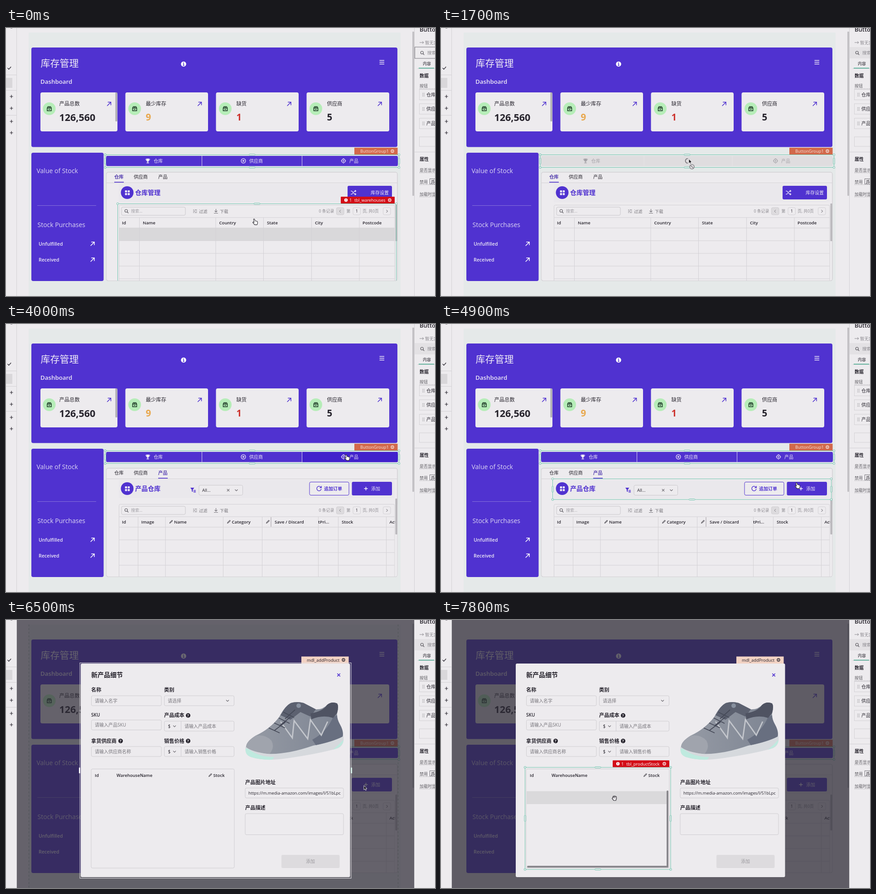
An HTML page for the animation above (7900 ms loop, 947x591 px).

```html
<!DOCTYPE html>
<html lang="zh-CN">
<head>
<meta charset="utf-8">
<title>库存管理</title>
<style>
html, body { margin: 0; width: 100%; height: 100%; overflow: hidden; background: #edebee; }
svg { display: block; width: 947px; height: 591px; font-family: "Open Sans", "Noto Sans CJK SC", "Noto Sans CJK", sans-serif; }
text { white-space: pre; }
</style>
</head>
<body>
<svg id="stage" viewBox="0 0 947 591"></svg>
<script>
const LOOP = 7900, STEP = 100;
const PAPER = '#edebee', PURPLE = '#5032d0', DEEP = '#4122cc', INK = '#26232c', GREY = '#8b898f',
      RULE = '#d3d1d5', GREEN = '#73c7b0', RED = '#d30d18', LIGHT = '#eeeaf6';

// Shape helpers, each returning SVG markup
const rect = (x, y, x2, y2, fill = 'none', stroke = 'none', r = 0, w = 1) =>
  `<rect x="${x}" y="${y}" width="${x2 - x}" height="${y2 - y}" rx="${r}" fill="${fill}" stroke="${stroke}" stroke-width="${w}"/>`;
const text = (x, y, s, size = 10, fill = INK, weight = 400) =>
  `<text x="${x}" y="${y}" font-size="${size}" fill="${fill}" font-weight="${weight}">${s}</text>`;
const line = (d, stroke = RULE, w = 1, fill = 'none') =>
  `<path d="${d}" stroke="${stroke}" stroke-width="${w}" fill="${fill}"/>`;
const shape = (d, fill) => `<path d="${d}" fill="${fill}"/>`;
const dot = (x, y, r, fill = 'none', stroke = 'none', w = 1) =>
  `<circle cx="${x}" cy="${y}" r="${r}" fill="${fill}" stroke="${stroke}" stroke-width="${w}"/>`;
const at = (x, y, body) => `<g transform="translate(${x} ${y})">${body}</g>`;
// Groups shown only during the given [from, to) spans
const during = (spans, ...body) => `<g data-spans="${spans}">${body.join('')}</g>`;

// Icons, centred on x, y
const plus = (x, y, c = INK, r = 3.5, w = 1.2) => line(`M${x - r} ${y}h${2 * r}M${x} ${y - r}v${2 * r}`, c, w);
const cross = (x, y, c, r = 3, w = 1.1) => line(`M${x - r} ${y - r}l${2 * r} ${2 * r}m0 ${-2 * r}l${-2 * r} ${2 * r}`, c, w);
const arrow = (x, y, c) => line(`M${x - 4.3} ${y + 4.3}l8.2-8.2M${x - 2.8} ${y - 4}h6.8v6.8`, c, 1.5);
const chevron = (x, y, c = '#66646b', r = 3) => line(`M${x - r} ${y - r / 2}l${r} ${r}l${r}${-r}`, c, 1.1);
const lens = (x, y, c = '#55535a') => dot(x - .7, y - .7, 3, 'none', c, 1.1) + line(`M${x + 1.5} ${y + 1.5}l2.8 2.8`, c, 1.2);
const gear = (x, y, c) => dot(x, y, 3, 'none', c, 1.3) + dot(x, y, 1, c);
const pencil = (x, y) => line(`M${x - 3} ${y + 3}l1-2.5l4.5-4.5l1.5 1.5l-4.5 4.5z`, '#55535a', 1, '#99979c');
const grid = (x, y) => [[-5, -5], [1, -5], [-5, 1], [1, 1]].map(([a, b]) => rect(x + a, y + b, x + a + 4.5, y + b + 4.5, LIGHT, 'none', .8)).join('');
const help = (x, y) => dot(x, y, 5, INK) + text(x - 2.2, y + 3.2, '?', 8.5, PAPER, 700);
const crate = (x, y) => line(`M${x - 4.5} ${y - 1.5}h9v6h-9zl1.5-3h6l1.5 3M${x} ${y - 4.5}v3M${x - 1.8} ${y + 1.6}h3.6`, '#173220', 1.5);
const alert = (x, y) => dot(x, y, 3.7, '#fff') + line(`M${x} ${y - 2.2}v2.6m0 .8v1`, RED, 1.1);
const icons = [
  (x, y, c) => shape(`M${x - 3} ${y - 5}h6v4q-.6 2.5-2.3 2.8v2h2v1.4h-5.4v-1.4h2v-2q-1.7-.3-2.3-2.8z`, c) + line(`M${x - 3} ${y - 4}h-1.6q0 3 2 3.2M${x + 3} ${y - 4}h1.6q0 3-2 3.2`, c, .9),
  (x, y, c) => dot(x, y, 4.9, 'none', c, 1.3) + plus(x, y, c, 2.4, 1.3),
  (x, y, c) => dot(x, y, 4, 'none', c, 1.3) + dot(x, y, 1.5, c) + line(`M${x} ${y - 5.6}v2m0 7.2v2M${x - 5.6} ${y}h2m7.2 0h2`, c, 1.2),
];

// Selection outline with corner squares and pill handles on the listed sides
function outline(x, y, x2, y2, sides) {
  const mx = (x + x2) / 2, my = (y + y2) / 2;
  const grips = { t: [mx, y, 6.5, 1.5], b: [mx, y2, 6.5, 1.5], l: [x, my, 1.5, 6.5], r: [x2, my, 1.5, 6.5] };
  return rect(x, y, x2, y2, 'none', GREEN) +
    [[x, y], [x2, y], [x, y2], [x2, y2]].map(([a, b]) => rect(a - 2, b - 2, a + 2, b + 2, PAPER, GREEN, 1)).join('') +
    [...sides].map(s => grips[s]).map(([a, b, w, h]) => rect(a - w, b - h, a + w, b + h, PAPER, GREEN, 1)).join('');
}
const errorTag = (x, y, x2, name) => rect(x, y, x2, y + 15, RED, 'none', 1) + alert(x + 11.5, y + 7.5) +
  text(x + 19, y + 11, '1', 9.4, '#fff') + text(x + 30, y + 11, name, 9.4, '#fff') + gear(x2 - 11, y + 7.5, '#fff');

function sidePanels() {
  const small = (y, s) => text(913, y, s, 9, '#5d5b61') + `<path d="M913 ${y + 3}h34" stroke="#aaa8ad" stroke-dasharray="2 1.5"/>`;
  const item = (y, s) => rect(912.5, y - 11.5, 960, y + 11.5, 'none', RULE) +
    [-3, 0, 3].map(d => dot(920, y + d, .8, GREY) + dot(923, y + d, .8, GREY)).join('') + text(928, y + 3.5, s, 10);
  return rect(0, 0, 23, 591, PAPER) + line('M23.5 0V591M0 103.5H23M0 137.5H23M0 192.5H23') + rect(0, 110, 14, 132, '#d9d7da') +
    line('M3.5 88l2.7 3l5-5.5', INK, 1.2) + line('M10 0h4', INK) + [151, 177, 206, 231].map(y => plus(12, y)).join('') +
    rect(901, 0, 947, 591, PAPER) + line('M901.5 0V591') +
    text(913, 8, 'Button', 13, INK, 600) + line('M913 32h9m-3-2.5l3 2.5l-3 2.5', GREY) + text(925, 35.5, '暂无实体', 9.5, GREY) +
    during('0-1500', rect(902.5, 42, 960, 67, PAPER, '#77757c')) +
    during('1500-7900', rect(902, 42, 960, 67, '#e3e1e4')) +
    lens(919, 55) + text(930, 58, '搜索', 9.5, GREY) +
    line('M908 89.5H947') + text(920, 82, '内容', 9) + line('M911 88.5H945', '#40a98a', 1.6) +
    text(913, 109, '数据', 10, INK, 600) + small(131, '按钮') +
    item(147, '仓库') + item(178.5, '供应商') + item(210.5, '产品') + rect(912.5, 240, 960, 261, 'none', RULE) +
    line('M902 273.5H947') + text(913, 293, '属性', 10, INK, 600) + small(316.5, '是否显示') + small(342.5, '禁用') +
    rect(935.5, 332.5, 960, 344, PAPER, '#77757c') + text(939, 341.5, 'JS', 8.5, INK, 600) + small(369.5, '加载时显示');
}

function header() {
  const card = ([x, x2, cx, tx, ax, label, value, size, color]) => rect(x, 142, x2, 228, PAPER, 'none', 4) +
    dot(cx, 178, 14, '#b6edb8') + crate(cx, 178) + text(tx, 171, label, 11.3, INK, 500) +
    text(tx, size > 21 ? 205 : 203.5, value, size, color, 700) + arrow(ax, 167.5, PURPLE);
  return rect(56, 43, 864, 262.5, PURPLE, 'none', 4) + text(76.5, 85, '库存管理', 21, LIGHT, 500) +
    dot(392, 79.5, 5.7, '#fff') + line('M390.7 78.5h1.6v4M390.3 82.5h3.6M391.7 75.6v1.4', PURPLE, 1.3) +
    line('M824.5 71.5h10.5m-10.5 4h10.5m-10.5 4h10.5', LIGHT, 1.4) + text(76, 123, 'Dashboard', 13.3, LIGHT, 600) +
    [[76, 246, 95.5, 117.5, 227.5, '产品总数', '126,560', 21.5, INK],
     [263.5, 446, 284, 308.5, 427.5, '最少库存', '9', 20.5, '#e8a84e'],
     [463.5, 646, 484, 508.5, 625, '缺货', '1', 20.5, '#cd3530'],
     [663.5, 846, 684, 708.5, 825, '供应商', '5', 20.5, INK]].map(card).join('') +
    rect(241.5, 142, 245.5, 206, '#adabb1', 'none', 1);
}

const stockPanel = () => rect(56, 275, 215.5, 558, PURPLE, 'none', 4) + text(67.5, 319.5, 'Value of Stock', 14, '#dcd6f3') +
  line('M69 391.5H199', '#8673da', 1.2) + text(69.5, 439, 'Stock Purchases', 14, '#dcd6f3') +
  [['Unfulfilled', 476], ['Received', 511]].map(([s, y]) => text(72, y + 4, s, 10.6, LIGHT, 600) + arrow(191, y, '#fff')).join('');

const NAMES = ['仓库', '供应商', '产品'];
function buttonGroup() {
  const xs = [221, 432.5, 653.5, 865], iconX = [313, 524, 745];
  const enabled = rect(221, 282, 865, 304.5, PURPLE, 'none', 3) +
    during('900-1500', rect(xs[1], 282, xs[2], 304.5, DEEP)) +
    during('2200-2800', rect(xs[1], 282, xs[2], 304.5, DEEP)) +
    during('3100-4500', rect(xs[2], 282, xs[3], 304.5, DEEP, 'none', 2)) +
    line('M432.5 282v22.5M653.5 282v22.5', '#d9d4f0') +
    NAMES.map((s, i) => icons[i](iconX[i], 293, LIGHT) + text(iconX[i] + 13, 296.8, s, 10, LIGHT)).join('');
  const loading = (edges, busy) => rect(221, 282, 865, 304.5, '#dfdddf', 'none', 3) +
    line(`M${edges[1]} 282v22.5M${edges[2]} 282v22.5`, '#e6e4e7') + NAMES.map((s, i) => {
      const mid = (edges[i] + edges[i + 1]) / 2, x = mid - 3.5 - s.length * 5;
      return i === busy ? at(mid - 1, 293, dot(0, 0, 5, 'none', '#cccacd', 1.8) + `<path class="spin" d="M0-5A5 5 0 0 0 0 5" stroke="#77757a" stroke-width="1.8" fill="none"/>`)
        : icons[i](x - 2, 293, '#a5a3a8') + text(x + 10.5, 296.8, s, 10, '#a5a3a8');
    }).join('');
  return during('0-1500,2200-3500,3900-7900', enabled) +
    during('1500-2200', loading([221, 448, 643, 865], 1)) + during('3500-3900', loading([221, 441, 670, 865], 2)) +
    outline(219, 279.5, 867.5, 307.5, 'tblr') + rect(769, 264, 864.5, 279, '#d2694b') +
    text(782, 275, 'ButtonGroup1', 9.4, '#f6e4dd') + gear(853, 271.5, '#f6e4dd');
}

// Table with toolbar; columns are [text x, label, has pencil]
function dataTable(top, edges, columns, extra = '') {
  const y = top + 14, head = top + 28, body = top + 51;
  const rows = [0, 28, 56, 84, 112].map(d => `M249 ${body + d}H858`).join('');
  const cols = edges.map(x => `M${x} ${head}V590`).join('');
  return rect(249.5, top + .5, 858, 600, 'none', RULE, 3) +
    rect(255, y - 9, 396, y + 9, 'none', '#c9c7cb', 3) + lens(266, y) + text(276, y + 3.3, '搜索...', 9, '#a19fa5') +
    line(`M413 ${y - 3}h2m1.5 0h5M413 ${y}h5m1.5 0h2M413 ${y + 3}h2m1.5 0h5`, '#77757b', 1.2) + text(426, y + 3.5, '过滤', 9.3, '#77757b') +
    line(`M463.5 ${y - 5}v7m-3-3l3 3l3-3M459 ${y + 4.5}h9`, '#77757b', 1.1) + text(472, y + 3.5, '下载', 9.3, '#77757b') + extra +
    text(690.5, y + 3.2, '0 条记录', 8.8, GREY) + rect(729.5, y - 8, 746, y + 8, '#dddbde', '#cfcdd1', 3) +
    line(`M739 ${y - 3}l-3 3l3 3`, '#807e84') + text(751.5, y + 3.2, '第', 8.8, GREY) +
    rect(766, y - 8, 782.5, y + 8, 'none', RULE, 3) + text(771.7, y + 3.2, '1', 9, INK) + text(787, y + 3.2, '页, 共0页', 8.8, GREY) +
    rect(832.5, y - 8, 849, y + 8, 'none', RULE, 3) + line(`M839.5 ${y - 3}l3 3l-3 3`, '#55535a') +
    line(`M249 ${head}H858` + rows + cols) +
    columns.map(([x, s, edit]) => text(x, top + 43, s, 9.6, INK, 600) + (edit ? pencil(x - 7, top + 39.5) : '')).join('');
}

const sectionTitle = (y, s, size) => rect(249, 344, 858, y + 21, '#eae8ec') + dot(267.5, y, 14, PURPLE) + grid(267.7, y) +
  text(285, y + 5, s, size, PURPLE, 600);
const filled = (x, y, fill = PURPLE) => rect(x, y, 852, y + 30, fill, 'none', 3);

const warehouses = () => sectionTitle(363, '仓库管理', 14) + filled(754, 348) +
  line('M761 359.5h2.5l6 7h2.5M761 366.5h2.5l2-2.4m2-2.2l2-2.4h2.5M770.5 357.5l2 2l-2 2m0 3l2 2l-2 2', '#fff', 1.2) +
  text(805, 366.8, '库存设置', 10, LIGHT, 500) +
  during('0-500', rect(249, 441, 858, 469, '#d9d8da')) +
  dataTable(390, [294.5, 463, 568.5, 674.5, 780],
    [[256, 'Id'], [302, 'Name'], [470.5, 'Country'], [576, 'State'], [682, 'City'], [787, 'Postcode']]) +
  rect(859.5, 387, 864, 470, '#bab8bc', 'none', 1);

const suppliers = () => sectionTitle(370, 'Manage Suppliers', 13.4) + filled(773, 355) + plus(785.5, 370, '#fff', 4, 1.5) +
  text(824, 373.5, 'New', 9.6, LIGHT, 500) +
  dataTable(397, [354.5, 460.5, 566.5, 752.5],
    [[268.5, 'Name', 1], [374, 'Email', 1], [479.5, 'Phone', 1], [573.5, 'Address'], [760.5, 'Save / Discard']],
    plus(508.5, 411, '#77757b', 4, 1.1) + text(515, 414.5, '新增一行', 9.3, '#77757b')) +
  line('M752.5 425V557', '#b9b7bc', 1.6) + rect(859.5, 385, 864, 464, '#bab8bc', 'none', 1);

const products = () => sectionTitle(363, '产品仓库', 14) +
  shape('M407 361h8.5l-3.2 4.5v5l-2.2-1.5v-3.5z', PURPLE) + line('M414 366.5h5m-5 2.2h5m-5 2.2h5', PURPLE, 1.2) +
  rect(426, 355.5, 522.5, 377.5, PAPER, '#cbc9cd', 3) + text(433, 369.5, 'All...', 9.6) + cross(490.5, 366.5, '#66646b', 2.7) + chevron(508.5, 366.5) +
  rect(670, 348.5, 757, 377.5, PAPER, PURPLE, 3) + line('M695.5 360.5a5 5 0 1 0 .5 3.2M696.2 357.2v3.8h-3.8', PURPLE, 1.4) +
  text(702, 366.8, '追加订单', 10, PURPLE, 600) + filled(763.5, 348) + during('5000-6500', filled(763.5, 348, DEEP)) +
  plus(794.5, 363, '#fff', 4, 1.4) + text(806, 366.8, '添加', 10, LIGHT, 500) +
  dataTable(397, [291.5, 352, 479.5, 565.5, 689.5, 733.5, 839.5],
    [[256, 'Id'], [298.5, 'Image'], [371, 'Name', 1], [498.5, 'Category', 1], [584.5, '', 1], [593, 'Save / Discard'], [689, 'tPri...'], [741, 'Stock'], [846.5, 'Action']]) +
  line('M585 426v21', '#b9b7bc', 1.6) + rect(858.5, 398, 880, 557, PAPER) + rect(859.5, 385, 864, 464, '#bab8bc', 'none', 1);

function tabs() {
  const xs = [239, 282, 336], ends = [260, 313.5, 357], spans = ['0-2200', '2200-3900', '3900-7900'];
  return rect(221.5, 318, 864, 557.5, PAPER, RULE, 4) + line('M222 341.5H864') +
    NAMES.map((s, i) => text(xs[i], 332, s, 10.3) +
      during(spans[i], text(xs[i], 332, s, 10.3, PURPLE), line(`M${xs[i]} 340h${ends[i] - xs[i]}`, PURPLE, 1.6))).join('') +
    '<g clip-path="url(#pane)">' + [warehouses, suppliers, products].map((f, i) => during(spans[i], f())).join('') +
    during('0-500', outline(246.5, 387.5, 861.5, 640, 't')) + '</g>' +
    rect(221.5, 318, 864, 557.5, 'none', RULE, 4) +
    during('0-500', errorTag(739, 372, 858, 'tbl_warehouses')) +
    during('4700-6200', outline(246.5, 341.5, 861.5, 387, 'blr'));
}

const shoe = () =>
  // sole with its tinted toe and heel
  shape('M529 279Q526 296 540 302Q572 312 620 305Q690 295 732 283Q748 276 745 255L715 262L580 284Z', '#d6d9dd') +
  shape('M529 283Q527 297 540 302Q562 309 588 308L592 302Q556 302 535 284ZM722 286Q744 280 745 264L735 274Z', '#bfeadf') +
  // upper, toe cap and heel
  shape('M530 280Q530 268 551 255Q582 241 603 214Q616 189 629 183Q642 179 657 183L684 197Q699 198 709 187Q719 179 731 184Q735 190 731 205Q729 217 737 230Q746 246 743 257Q722 268 678 277Q620 297 578 295Q543 291 530 280Z', 'url(#mesh)') +
  shape('M530 280Q531 267 552 255Q574 252 586 266Q594 281 582 295Q543 291 530 280Z', '#a0a4ad') +
  shape('M676 264Q708 247 722 214L731 210Q731 219 737 230Q746 246 743 257Q722 268 684 276Z', '#686f80') +
  // tongue and collar
  shape('M606 210Q617 189 629 183Q642 179 657 183L684 197L672 213L650 203L628 220Z', '#5c6170') +
  shape('M672 206Q699 202 709 187Q719 179 731 184Q735 190 731 205L722 216Q700 208 674 219Z', '#4f5362') +
  line('M606 224l26 36l4-38l30 40l6-42l24 34l14-30', '#c3c6cc', 2.8) +
  line('M602 216l24 12M592 227l24 11M580 238l24 11M612 203l24 12M604 233l24-19M592 244l25-19M616 218l22-20', '#454957', 1.8) +
  dot(646, 189, 5, '#87909f');

function modal() {
  const label = (x, y, s, size = 11.2) => text(x, y, s, size, INK, 600);
  const field = (x, y, x2, hint, h = 22) => rect(x + .5, y, x2, y + h, 'none', '#cfcdd1', 3) + text(x + 8, y + h / 2 + 3.7, hint, 10, '#77757b');
  const price = (y, hint) => rect(349.5, y, 503.5, y + 22, 'none', '#cfcdd1', 3) + line(`M386.5 ${y}v22`, '#cfcdd1') +
    text(357.5, y + 14.6, '$', 10) + chevron(372, y + 11.2) + text(394, y + 14.6, hint, 10, '#77757b');
  return rect(652, 80.5, 756.5, 96, '#f2d2c3') + text(664, 91.5, 'mdl_addProduct', 9.4) + gear(745, 88, INK) +
    rect(165, 96, 759.5, 567, PAPER, 'none', 3) +
    during('6500-7200', rect(163, 94.5, 762, 569.5, 'none', '#e4e2e6'), rect(161, 325.5, 164, 338, '#fff'), rect(761, 325.5, 764, 338, '#d8f1e9')) +
    text(188, 126, '新产品细节', 14, INK, 600) + cross(734.5, 121.2, PURPLE, 3.2, 1.7) +
    label(188, 158, '名称') + field(188, 167, 343, '请输入名字') + label(349, 158, '类别') + field(349, 167, 503.5, '请选择') + chevron(489, 178) +
    label(188, 212.5, 'SKU', 10) + field(188, 220.5, 343, '请输入产品SKU') + label(349, 214, '产品成本') + help(402, 210.5) + price(223, '请输入产品成本') +
    label(188, 270.5, '拿货供应商') + help(253, 266.8) + field(188, 279, 343, '请输入供应商名称') +
    label(349, 270.5, '销售价格') + help(402, 266.8) + price(279, '请输入销售价格') +
    rect(188, 328.5, 504, 547, 'none', '#cfcdd1', 3) + text(196, 346, 'Id', 9.6, INK, 600) + text(244, 346, 'WarehouseName', 9.5, INK, 600) +
    pencil(450.5, 342.5) + text(457.5, 346, 'Stock', 9.6, INK, 600) + shoe() +
    label(528, 361.5, '产品图片地址') + rect(528, 370.5, 745, 392.5, 'none', '#cfcdd1', 3) +
    text(535, 385, 'https://m.media-amazon.com/images/I/51bLpc', 9.3) +
    label(528, 418, '产品描述') + rect(528, 427, 745, 473.5, 'none', '#cfcdd1', 3) +
    rect(608, 518, 736.5, 547, '#dddbde', 'none', 3) + text(662, 536.3, '添加', 10, '#9b999e') +
    during('7400-7900', rect(189, 377.5, 498, 406, '#dad9db'), rect(498, 376, 502, 546, '#8a888d', 'none', 2), rect(190, 542, 502, 546, '#8a888d', 'none', 2),
      outline(185.5, 325, 507, 550, 'tblr'), errorTag(379, 309.5, 504, 'tbl_productStock'));
}

// Pointer shapes, hot spot at 0,0
const POINTERS = {
  hand: line('M-2.5-5.5q1.3-1.2 2.2.3l1.5 3.8l3.4.3q1.8.6 1.8 2.4l-.4 3.8l-1 1.8h-5l-4.2-5q-.2-1.5 1.7-.8l1.2.7z', '#2b2930', 1.1, '#fff'),
  open: line('M-4.5-1q1.2-1 1.8.5l-.8-3.3q1-1.4 1.9 0q.8-2 2-.2q1.4-1.3 2 .3q1.6-.7 1.8 1l.2 3.4l-1.4 4.3h-4.8l-3.4-4.2z', '#2b2930', 1.2, PAPER) + line('M-.7-3.2v3M1.3-3v2.8', '#2b2930', .8),
  arrow: line('M0 0v9.5l2.2-2l1.6 3.4l1.6-.8l-1.6-3.2h3.2z', '#fff', .8, '#17151a'),
  blocked: line('M0-4v9.5l2.2-2l1.6 3.4l1.6-.8l-1.6-3.2h3.2z', '#fff', .8, '#17151a') + dot(7, 13, 5, '#dfdddf', '#8a888d', 1.6) + line('M3.6 9.6l6.8 6.8', '#8a888d', 1.6),
};
// [time, x, y, pointer]
const PATH = [
  [0, 549, 427, 'hand'], [300, 549, 427, 'hand'], [1000, 547, 293, 'hand'], [1500, 547, 293, 'blocked'], [2200, 547, 293, 'hand'],
  [2600, 547, 293, 'hand'], [3100, 662, 292, 'hand'], [3400, 752, 294, 'hand'], [3500, 752, 294, 'blocked'], [3900, 752, 294, 'hand'],
  [4400, 752, 294, 'hand'], [4900, 786, 356, 'hand'], [5400, 786, 356, 'hand'], [6100, 790, 368, 'hand'], [6300, 790, 365, 'arrow'],
  [7000, 790, 365, 'arrow'], [7400, 490, 386, 'open'], [7700, 383, 393, 'open'], [LOOP, 383, 393, 'open'],
];

const stage = document.getElementById('stage');
stage.innerHTML = '<defs><clipPath id="pane"><rect x="222" y="342" width="643" height="215"/></clipPath>' +
  '<linearGradient id="mesh"><stop stop-color="#969ba5"/><stop offset="1" stop-color="#7d8492"/></linearGradient></defs>' +
  rect(0, 0, 947, 591, PAPER) + during('0-6600', rect(50, 10, 871, 591, '#e5e9e9')) + rect(897, 8, 901, 370, '#c3c1c5', 'none', 1) +
  header() + stockPanel() + tabs() + buttonGroup() +
  during('6500-7900', rect(23.5, 0, 901, 591, 'rgba(46,43,54,.71)')) +
  during('6500-6600', '<path d="M50.5 10V591M865.5 10V591" stroke="#4f5356" stroke-dasharray="4 4"/>') +
  during('6600-7900', rect(23.5, 0, 901, 591, 'rgba(46,40,52,.1)')) +
  sidePanels() + during('6500-7900', modal()) +
  '<g id="pointer">' + Object.entries(POINTERS).map(([k, s]) => `<g data-kind="${k}">${s}</g>`).join('') + '</g>';

const timed = [...stage.querySelectorAll('[data-spans]')].map(el => ({
  el, spans: el.dataset.spans.split(',').map(s => s.split('-').map(Number)),
}));
const spinners = stage.querySelectorAll('.spin');
const pointer = document.getElementById('pointer');
const ease = p => p * p * (3 - 2 * p);

function render(t) {
  for (const { el, spans } of timed) el.style.display = spans.some(([a, b]) => t >= a && t < b) ? '' : 'none';
  for (const el of spinners) el.setAttribute('transform', `rotate(${(t - 1700) * .72})`);
  const i = PATH.findIndex(p => p[0] > t), [t0, x0, y0, kind] = PATH[i - 1], [t1, x1, y1] = PATH[i];
  const p = ease((t - t0) / (t1 - t0));
  pointer.setAttribute('transform', `translate(${x0 + (x1 - x0) * p} ${y0 + (y1 - y0) * p})`);
  for (const el of pointer.children) el.style.display = el.dataset.kind === kind ? '' : 'none';
}
function tick() {
  render(Math.floor(performance.now() % LOOP / STEP) * STEP);
  requestAnimationFrame(tick);
}
tick();
</script>
</body>
</html>
```
